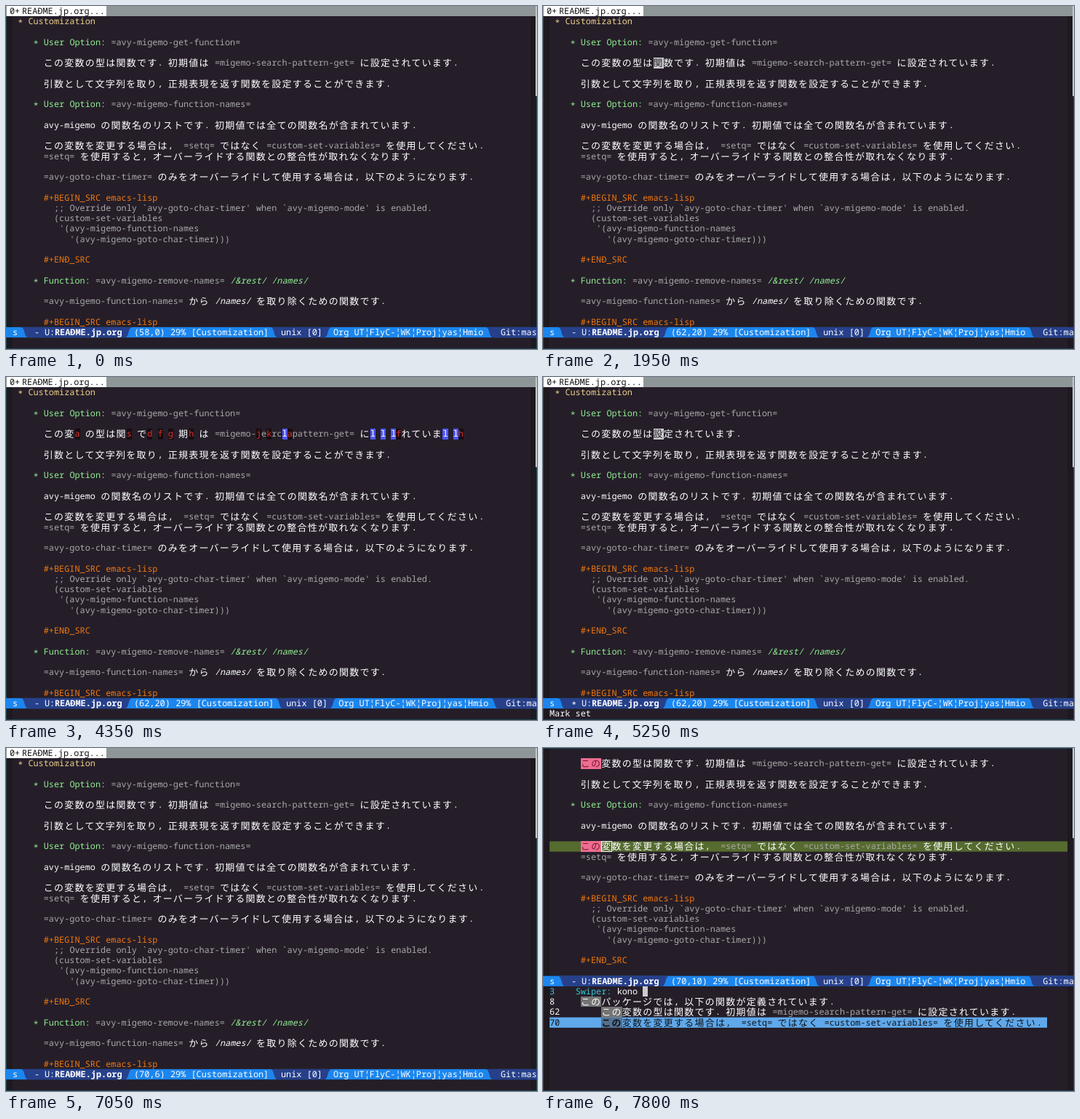
An HTML page for the animation above (8000 ms loop, 730 by 472 pixels).

```html
<!DOCTYPE html>
<html lang="ja">
<head>
<meta charset="utf-8">
<title>avy-migemo</title>
<style>
html, body { margin: 0; width: 100%; height: 100%; overflow: hidden; background: #1d191f; }
#stage { position: relative; width: 730px; height: 472px; overflow: hidden; text-rendering: geometricPrecision; }
#stage div, #stage svg { position: absolute; }
#stage svg { left: 0; top: 0; }
span {
  position: absolute; height: 14.25px; white-space: pre; color: #fff;
  font: 11.875px/14.25px 'Noto Sans Mono', 'DejaVu Sans Mono', monospace;
}
.jp { font: 13px/13px 'Noto Sans CJK JP', 'Noto Sans CJK', sans-serif; letter-spacing: 1.25px; }
.page { left: 9px; top: 0; width: 712px; height: 472px; background: #251e29; }
.frame { left: 0; top: 0; width: 728px; height: 470px; border: 1px solid #1b4352; }
.thumb { left: 728px; top: 0; width: 2px; height: 124px; background: #c4c8c8; }
.top { left: 0; top: 0; width: 730px; height: 14px; background: #8f9697; }
.tab { left: 1px; top: 0; width: 137px; height: 14px; background: #fff; }
.ink { color: #111; }
.h2 { color: #eecf8a; }
.h3 { color: #90ee90; }
.g, .code { color: #a8a8a8; }
.src { color: #f0780f; }
.it { font-style: italic; }
.star { margin-top: 2px; }
.hid { color: transparent; }
.bold { font-weight: bold; }
.cyan { color: #35c6d2; }
.hit { background: #6b8540; }
.cur { background: #cbcbcb; color: #251e29; }
.box { outline: 1px solid #fff; outline-offset: -1px; }
.key { background: #170d10; color: #e33030; }
.lead { background: #4f57ff; }
.far { background: #148a8a; }
.pink { background: #ee6d90; color: #7c1432; }
.sel { color: #10151c; }
.found { background: #747474; }
.picked { background: #55718f; color: #10151c; font-weight: bold; }
</style>
</head>
<body>
<div id="stage"></div>
<script>
const W = 7.125, H = 14.25, X = 9, Y = 14.4;
const KEYS = [...'asdfghjkl'];
const FACES = ['key', 'lead', 'far'];
const WORD = /[A-Za-zĐ]+|'(?=\()|[ァ-ー]+[ぁ-ん]*|[一-龠]+[ぁ-ん]*|[ぁ-ん]+/g;

// line: [column, class, text]
const doc = {
  0: [0, 'h2', '** Customization'],
  2: [4, 'h3', '* User Option: =avy-migemo-get-function='],
  4: [6, '', 'この変数の型は関数です. 初期値は =migemo-search-pattern-get= に設定されています.'],
  6: [6, '', '引数として文字列を取り, 正規表現を返す関数を設定することができます.'],
  8: [4, 'h3', '* User Option: =avy-migemo-function-names='],
  10: [6, '', 'avy-migemo の関数名のリストです. 初期値では全ての関数名が含まれています.'],
  12: [6, '', 'この変数を変更する場合は,  =setq= ではなく =custom-set-variables= を使用してください.'],
  13: [6, '', '=setq= を使用すると, オーバーライドする関数との整合性が取れなくなります.'],
  15: [6, '', '=avy-goto-char-timer= のみをオーバーライドして使用する場合は, 以下のようになります.'],
  17: [6, 'src', '#+BEGIN_SRC emacs-lisp'],
  18: [8, 'code', ";; Override only `avy-goto-char-timer' when `avy-migemo-mode' is enabled."],
  19: [8, 'code', '(custom-set-variables'],
  20: [9, 'code', "'(avy-migemo-function-names"],
  21: [11, 'code', "'(avy-migemo-goto-char-timer)))"],
  23: [6, 'src', '#+ENĐ_SRC'],
  25: [4, 'h3', '* Function: =avy-migemo-remove-names= /&rest/ /names/'],
  27: [6, '', '=avy-migemo-function-names= から /names/ を取り除くための関数です.'],
  29: [6, 'src', '#+BEGIN_SRC emacs-lisp']
};
const zapped = [6, '', 'この変数の型は設定されています.'];
const intro = [6, '', 'このパッケージでは, 以下の関数が定義されています.'];
const rows = Object.keys(doc).map(Number);

function cells([col, cls, text]) {
  const out = [...text].map(ch => {
    const c = { ch, col, cls, w: ch > '\u2fff' ? 2 : 1 };
    col += c.w;
    return c;
  });
  for (const m of text.matchAll(/=[\w-]+=|\/&?\w+\//g))
    for (let k = 0; k < m[0].length; k++)
      out[m.index + k].cls = m[0][0] === '=' ? 'g' : cls + ' it';
  if (!out[0].col) out[0].cls = 'hid';
  return out;
}

// jump labels: { row, i, label }
const matches = (re, labels) =>
  rows.flatMap(row => [...doc[row][2].matchAll(re)].map(m => ({ row, i: m.index })))
    .map((t, n) => ({ ...t, label: labels[n] }));
const narrow = (tags, key) =>
  tags.filter(t => t.label[0] === key).map(t => ({ ...t, label: t.label.slice(1) }));
const under = prefix => KEYS.map(k => prefix + k);

const kanTags = matches(/関/g, KEYS);
const lineTags = [3, 8, 10, 11, 13, 15, 26, 28, 31, 47, 48, 49, 54, 55]
  .map((i, n) => ({ row: 4, i, label: [...KEYS.slice(0, 8), ...under('l')][n] }));
const wordTags = matches(WORD, [
  ...[...'asdfgh'].flatMap(under), ...under('j').slice(0, 7), ...under('jk').slice(0, 4),
  ...['jl', 'ka', 'ks', 'kd', 'kf', 'kg', 'kh'].flatMap(under)
]);

function addTags(line, tags) {
  for (let k = tags.length - 1; k >= 0; k--) {
    const { i, label } = tags[k];
    const room = k + 1 < tags.length ? tags[k + 1].i - i : label.length;
    const shown = [...label.slice(0, room)];
    let n = 0, w = 0;
    while (w < shown.length && i + n < line.length) w += line[i + n++].w;
    const col = line[i].col;
    line.splice(i, n, ...shown.map((ch, j) =>
      ({ ch, w: 1, col: col + j, cls: FACES[label.length - 1 - j] })));
  }
}

const text = (x, row, str, cls = '') =>
  `<span class="${cls}${str === '*' ? ' star' : ''}" style="left:${x}px;top:${Y + row * H}px">${str.replace(/&/g, '&amp;')}</span>`;
const put = (col, row, str, cls) => text(X + col * W, row, str, cls);
// SVG keeps the fractional edges of a row soft
const svg = (row, body) =>
  `<svg width="730" height="472"><g transform="translate(0 ${Y + row * H})">${body}</g></svg>`;
const bar = (row, w, fill) => svg(row, `<rect x="${X}" width="${w}" height="${H}" fill="${fill}"/>`);

function draw(line, row, shift = 0) {
  const runs = [];
  let last = null;
  for (const c of line) {
    if (c.ch === ' ') { last = null; continue; }
    if (last && last.cls === c.cls && last.w === c.w && last.end === c.col) last.ch += c.ch;
    else runs.push(last = { ...c });
    last.end = c.col + c.w;
  }
  return runs.map(r => put(r.col + shift, row, r.ch, r.cls + (r.w > 1 ? ' jp' : ''))).join('');
}

function modeline(s, row) {
  const pos = `(${58 + s.row},${s.col})`, dx = (pos.length - 6) * W;
  const dark = (a, b) =>
    `<path fill="#27408b" d="M${a} 0C${a + 7} 0 ${a + 4} ${H} ${a + 11} ${H}H${b}C${b + 7} ${H} ${b + 4} 0 ${b + 11} 0Z"/>`;
  return svg(row, `<rect width="730" height="${H}" fill="#1c86ee"/>` +
      dark(20, 163) + dark(363 + dx, 437 + dx) + dark(659 + dx, 760)) +
    text(9, row, 's') + text(39, row, s.mod) + text(53, row, 'U:') +
    text(67, row, 'REAĐME.jp.org', 'bold') + text(176, row, pos) +
    text(226 + dx, row, '29%') + text(254.5 + dx, row, '[Customization]') +
    text(378 + dx, row, 'unix [0]') + text(450 + dx, row, 'Org UT¦FlyC-¦WK¦Proj¦yas¦Hmio') +
    text(680 + dx, row, 'Git:master');
}

function swiper(query) {
  const full = query.length > 1;
  const list = full ? [-50, 4, 12] : [7, 8, 9, 10, 11, 12, 13, 14, 15];
  let html = put(0, 22, full ? '3' : query ? '164' : '191', 'cyan') + put(5, 22, 'Swiper:', 'cyan') +
    put(13, 22, query) + put(13 + query.length, 22, ' ', 'cur');
  list.forEach((d, n) => {
    const row = 23 + n, on = d === 12;
    if (on) html += bar(row, 96 * W, '#5fa8ea');
    html += put(0, row, String(58 + d), on ? 'sel' : '');
    const src = d < 0 ? intro : doc[d];
    if (!src) return;
    const line = cells(src);
    if (on) line.forEach(c => c.cls = 'sel');
    if (full) line.slice(0, 2).forEach(c => c.cls = on ? 'picked' : 'found');
    html += draw(line, row, d < 0 ? 0 : 4);
  });
  return html;
}

function scene(s) {
  const find = s.sw !== null, shift = find ? 4 : 0, end = find ? 21 : 30;
  let html = '<div class="page"></div><div class="frame"></div>';
  if (!find) html += '<div class="top"></div><div class="tab"></div>' +
    text(5, -1, '0+', 'ink') + text(22, -1, 'REAĐME.jp.org...', 'ink');
  html += '<div class="thumb"></div>';
  for (const d of rows) {
    const row = d - shift;
    if (row < 0 || row >= end) continue;
    const line = cells(s.zap && d === 4 ? zapped : doc[d]);
    if (s.hit) for (const m of doc[d][2].matchAll(s.hit)) line[m.index].cls = 'hit';
    const here = d === s.row && line.find(c => c.col === s.col);
    if (find) {
      if (d === 12) html += bar(row, 712, '#556b2f');
      if (s.sw.length > 1 && (d === 4 || d === 12)) line.slice(0, 2).forEach(c => c.cls = 'pink');
      if (here) here.cls = 'box';
    } else if (s.on && here) here.cls = 'cur';
    addTags(line, s.tags.filter(t => t.row === d));
    html += draw(line, row);
  }
  return html + modeline(s, end) + (find ? swiper(s.sw) : put(0, 31, s.echo));
}

const steps = [
  [0, { row: 0, col: 0, on: 0, echo: '', mod: '-', hit: null, tags: [], zap: 0, sw: null }],
  [300, { on: 1 }],
  [600, { echo: 'char: ' }],
  [750, { echo: 'char (k):', hit: /[かきくけこ関期型変下]/g }],
  [900, { echo: 'char (ka):', hit: /[か関型変]/g }],
  [1050, { echo: 'char (kan):', hit: /関/g }],
  [1200, { on: 0 }],
  [1350, { on: 1 }],
  [1650, { hit: null, tags: kanTags }],
  [1950, { tags: [], echo: '', row: 4, col: 20 }],
  [2250, { echo: 'char: ' }],
  [2400, { on: 0 }],
  [2550, { on: 1, echo: 'char: s' }],
  [2700, { on: 0, echo: '', tags: lineTags }],
  [3150, { tags: narrow(lineTags, 'l') }],
  [3450, { tags: [], col: 69, on: 1, echo: 'Mark set' }],
  [3750, { col: 20, echo: '' }],
  [3900, { echo: 'Zap up to char: ' }],
  [4050, { echo: 'Zap up to char: s' }],
  [4350, { on: 0, echo: '', tags: lineTags }],
  [4650, { tags: narrow(lineTags, 'l') }],
  [4950, { tags: [], zap: 1, mod: '*' }],
  [5100, { on: 1 }],
  [5250, { echo: 'Mark set' }],
  [5400, { zap: 0, mod: '-', col: 69, echo: 'Undo!' }],
  [5700, { echo: '' }],
  [5850, { on: 0 }],
  [6000, { on: 1 }],
  [6300, { on: 0, tags: wordTags }],
  [6450, { tags: narrow(wordTags, 'g') }],
  [6600, { tags: [], row: 12, col: 6, on: 1 }],
  [7050, { on: 0 }],
  [7350, { sw: '' }],
  [7500, { sw: 'k' }],
  [7650, { sw: 'kon', col: 10 }],
  [7800, { sw: 'kono ' }]
];

const stage = document.getElementById('stage');
let shown = -1;
function tick() {
  const t = performance.now() % 8000;
  const n = steps.filter(s => s[0] <= t).length;
  if (n !== shown) {
    shown = n;
    stage.innerHTML = scene(Object.assign({}, ...steps.slice(0, n).map(s => s[1])));
  }
  requestAnimationFrame(tick);
}
tick();
</script>
</body>
</html>
```
